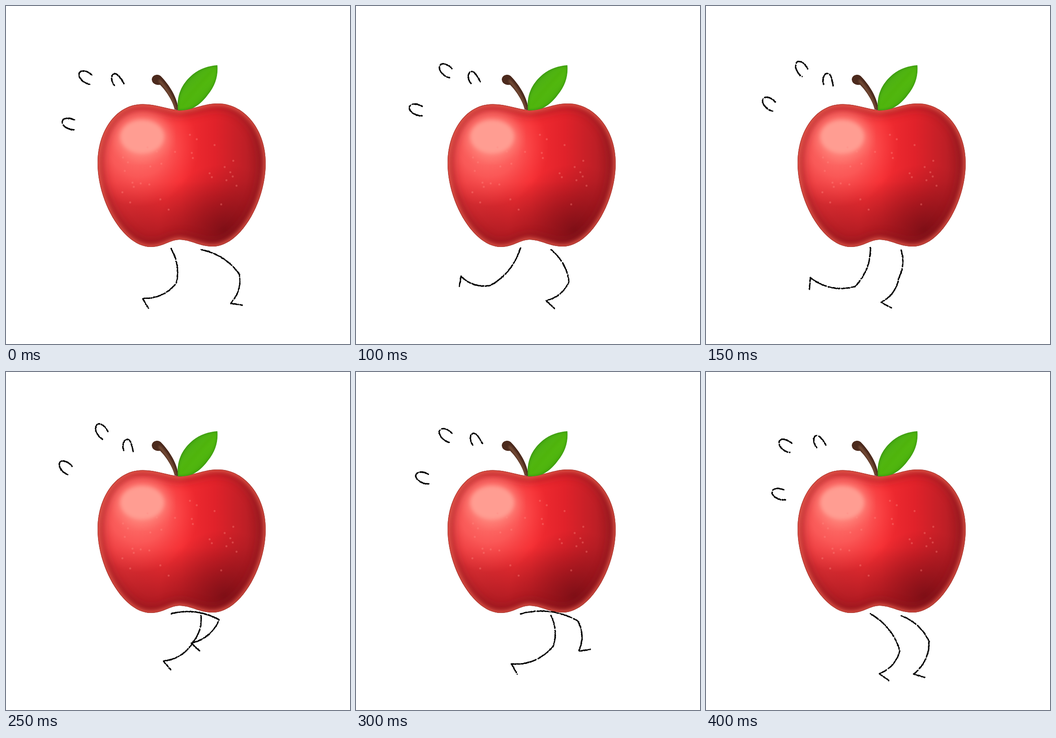
Recreate the animation shown at these times as an HTML page with a canvas. Size 755x742 px, loop 0.45 s.

```html
<!DOCTYPE html>
<html lang="en">
<head>
<meta charset="utf-8">
<title>Running apple</title>
<style>
html, body { margin: 0; width: 100%; height: 100%; overflow: hidden; background: #fff; }
svg, canvas { position: absolute; left: 0; top: 0; }
</style>
</head>
<body>
<svg width="755" height="742" viewBox="0 0 755 742">
  <defs>
    <path id="body" d="M381 229C355 227 330 215.500 300 215.500C241 215.500 201 275 201 345C201 430 258 529 318 529C345 529 360 513 381 513C405 513 425 528 453 528C515 528 570 430 570 345C570 270 522 214 465 214C435 214 420 225 381 229Z"/>
    <path id="leaf" d="M377 229C374 195 386 170 410 150C426 137 446 131 464 130C466 152 460 175 443 195C432 210 420 220 408 225C396 229 386 230 377 229Z"/>
    <path id="stem" d="M370 227C366 208 350 185 338 173C328 175 319 169 320 160C321 151 334 147 341 155C358 173 376 199 379 229Z"/>
    <clipPath id="inBody"><use href="#body"/></clipPath>
    <clipPath id="inLeaf"><use href="#leaf"/></clipPath>
    <clipPath id="inStem"><use href="#stem"/></clipPath>
    <linearGradient id="skin" x1="200" x2="570" y1="0" y2="0" gradientUnits="userSpaceOnUse">
      <stop offset="0" stop-color="#e2373b"/>
      <stop offset=".5" stop-color="#f52d32"/>
      <stop offset=".7" stop-color="#e0222a"/>
      <stop offset=".88" stop-color="#be1f26"/>
      <stop offset="1" stop-color="#99191f"/>
    </linearGradient>
    <linearGradient id="low" x1="0" x2="0" y1="385" y2="515" gradientUnits="userSpaceOnUse">
      <stop offset="0" stop-color="#96121a" stop-opacity="0"/>
      <stop offset="1" stop-color="#96121a" stop-opacity=".75"/>
    </linearGradient>
    <radialGradient id="glow" cx="292" cy="310" r="130" gradientUnits="userSpaceOnUse">
      <stop offset="0" stop-color="#ff7c74"/>
      <stop offset=".5" stop-color="#ff6461" stop-opacity=".75"/>
      <stop offset="1" stop-color="#fb4a4a" stop-opacity="0"/>
    </radialGradient>
    <radialGradient id="shade" cx="480" cy="492" r="145" gradientUnits="userSpaceOnUse">
      <stop offset="0" stop-color="#700d14" stop-opacity=".75"/>
      <stop offset="1" stop-color="#8a1018" stop-opacity="0"/>
    </radialGradient>
    <linearGradient id="green" x1="395" y1="160" x2="440" y2="205" gradientUnits="userSpaceOnUse">
      <stop offset="0" stop-color="#48aa14"/>
      <stop offset=".5" stop-color="#55bb10"/>
      <stop offset="1" stop-color="#49ae0c"/>
    </linearGradient>
    <filter id="soft2"><feGaussianBlur stdDeviation="2"/></filter>
    <filter id="soft4"><feGaussianBlur stdDeviation="4"/></filter>
    <filter id="soft10"><feGaussianBlur stdDeviation="10"/></filter>
  </defs>
  <g clip-path="url(#inBody)">
    <use href="#body" fill="url(#skin)"/>
    <use href="#body" fill="url(#low)"/>
    <use href="#body" fill="url(#glow)"/>
    <use href="#body" fill="url(#shade)"/>
    <use href="#body" fill="none" stroke="#8f1d24" stroke-width="24" opacity=".6" filter="url(#soft10)"/>
    <use href="#body" fill="none" stroke="#ee6550" stroke-width="10" opacity=".75" filter="url(#soft4)"/>
    <ellipse cx="300" cy="288" rx="60" ry="50" fill="#ff8a80" opacity=".6" filter="url(#soft10)"/>
    <ellipse cx="299" cy="287" rx="48" ry="37" fill="#ff9d92" filter="url(#soft4)"/>
    <path id="specks" fill="none" stroke="#ff8d84" stroke-width="4.500" stroke-linecap="round" opacity=".35"/>
    <use href="#body" fill="none" stroke="#a93a33" stroke-width="2"/>
  </g>
  <g clip-path="url(#inStem)">
    <use href="#stem" fill="#4c2a1d"/>
    <path d="M336 163Q361 188 373 228" fill="none" stroke="#85583f" stroke-width="4" filter="url(#soft2)"/>
  </g>
  <g clip-path="url(#inLeaf)">
    <use href="#leaf" fill="url(#green)"/>
    <path d="M381 222Q410 188 462 133" fill="none" stroke="#3f9f0d" stroke-width="5" opacity=".5" filter="url(#soft4)"/>
    <use href="#leaf" fill="none" stroke="#318b12" stroke-width="4" opacity=".7" filter="url(#soft2)"/>
  </g>
</svg>
<canvas id="ink" width="755" height="742"></canvas>
<script>
const STEP = 50, POSES = 9;
const ctx = document.getElementById('ink').getContext('2d');

function seeded(seed) {
  return () => (seed = (seed * 16807) % 2147483647) / 2147483647;
}

// Periodic motion: a centre plus two harmonics of the running cycle.
const wave = (centre, cos1, sin1 = 0, cos2 = 0, sin2 = 0) => t =>
  centre + cos1 * Math.cos(t) + sin1 * Math.sin(t) + cos2 * Math.cos(2 * t) + sin2 * Math.sin(2 * t);

const legs = [
  {
    hip: { x: 361, y: 531 },
    knee: { x: wave(396, -1, -94, 6, 10), y: wave(590, 15, 28, 8, -18) },
    ankle: { x: wave(339, 22, -129, -26, 6), y: wave(617, 30, -13, 9, -9) }
  },
  {
    hip: { x: 428, y: 535 },
    knee: { x: wave(456, 50, 20, -3, 7), y: wave(596, 0, 1, -8, -2) },
    ankle: { x: wave(406, 58, 41, 18, 7), y: wave(648, 8, 0, 3, -8) }
  }
];

const hook = 'M13 5C12-6 5-17-2-17C-9-17-12-8-11 0C-10 8-7 14-3 18';
const arch = 'M-9 11C-14 0-10-14-2-14C5-14 9 0 12 13';
const drops = [
  { shape: hook, lean: -31, x: wave(194, -20), y: wave(144, 14, 0, 2, -4) },
  { shape: arch, lean: -10, x: wave(258, -13, -3, 0, -2), y: wave(157, -5, 6, 6, 4) },
  { shape: hook, lean: -48, x: wave(142, 9, -11, 0, -11), y: wave(235, 30, -4, 0, -5) }
];
const tilt = wave(0, -16, 0, 8);

const at = (joint, t) => ({ x: joint.x(t), y: joint.y(t) });

// Curve segment from a to b that bulges forward.
function bend(a, b, bulge) {
  const x = (a.x + b.x) / 2 + bulge * (b.y - a.y);
  const y = (a.y + b.y) / 2 - bulge * (b.x - a.x);
  return `Q${x} ${y} ${b.x} ${b.y}`;
}

// The foot stays almost square to the shin.
function legPath({ hip, knee, ankle }, t) {
  const k = at(knee, t), a = at(ankle, t);
  const foot = Math.atan2(a.y - k.y, a.x - k.x) - 1.7;
  return `M${hip.x} ${hip.y}` + bend(hip, k, 0.2) + bend(k, a, 0.25) +
    `l${26 * Math.cos(foot)} ${26 * Math.sin(foot)}`;
}

// Crayon line: jittered dabs with irregular gaps.
function crayon(d, seed) {
  const path = document.createElementNS('http://www.w3.org/2000/svg', 'path');
  path.setAttribute('d', d);
  const random = seeded(seed * 7919 + 13), length = path.getTotalLength();
  const line = new Path2D();
  for (let s = 0; s <= length; s += 0.8) {
    const grain = Math.sin(s * 0.23 + seed) + Math.sin(s * 0.61 + seed * 2);
    const size = 0.9 + 0.95 * random();
    const dx = random() - 0.5, dy = random() - 0.5;
    if (grain > 1.5) continue;
    const p = path.getPointAtLength(s), x = p.x + dx, y = p.y + dy;
    line.moveTo(x + size, y);
    line.arc(x, y, size, 0, 7);
  }
  return line;
}

const poses = Array.from({ length: POSES }, (_, n) => {
  const t = 2 * Math.PI * (n + 0.5) / POSES;
  const ink = new Path2D();
  legs.forEach((leg, i) => ink.addPath(crayon(legPath(leg, t), n * 5 + i + 1)));
  drops.forEach(({ shape, lean, x, y }, i) =>
    ink.addPath(crayon(shape, n * 5 + i + 3),
      new DOMMatrix().translate(x(t), y(t)).rotate(lean + tilt(t))));
  return ink;
});

const random = seeded(4242);
document.getElementById('specks').setAttribute('d', Array.from({ length: 30 }, () => {
  const angle = 2 * Math.PI * random(), reach = Math.sqrt(random());
  return `M${375 + 135 * reach * Math.cos(angle)} ${375 + 95 * reach * Math.sin(angle)}h0`;
}).join(''));

function draw() {
  const n = Math.floor(performance.now() / STEP) % POSES;
  ctx.clearRect(0, 0, 755, 742);
  ctx.fill(poses[n]);
  requestAnimationFrame(draw);
}
draw();
</script>
</body>
</html>
```
